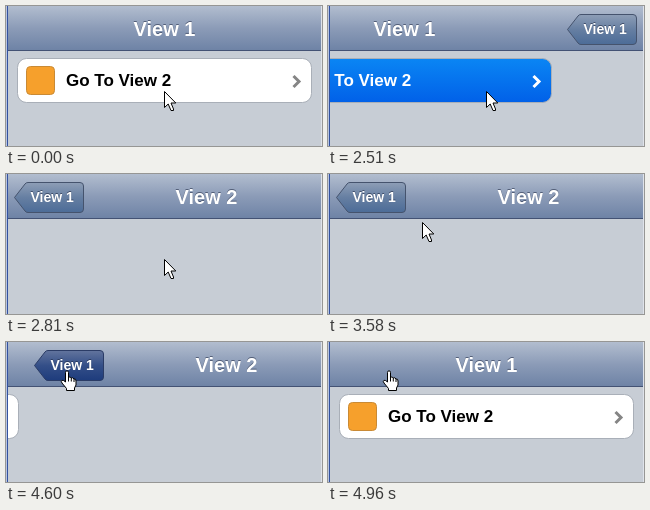
Recreate the animation shown at these times as an HTML page with a canvas. Size 316 by 140 pixels, loop 6220 ms.

```html
<!DOCTYPE html>
<html lang="en">
<head>
<meta charset="utf-8">
<title>View slide</title>
<style>
html, body { margin: 0; width: 100%; height: 100%; overflow: hidden; background: #c7cdd5; }
canvas { display: block; width: 316px; height: 140px; }
</style>
</head>
<body>
<canvas id="stage" width="316" height="140"></canvas>
<script>
const ctx = document.getElementById('stage').getContext('2d');
const LOOP = 6220, STEP = 60, SLIDE = 350, PAGE = 313;
const FONT = '"Liberation Sans", Arial, sans-serif';

const clamp = v => Math.max(0, Math.min(1, v));
const ease = p => p * p * (3 - 2 * p);
const snap = (t, start) => start + Math.floor((t - start) / STEP) * STEP;

function vertical(y0, y1, ...colors) {
  const g = ctx.createLinearGradient(0, y0, 0, y1);
  colors.forEach((c, i) => g.addColorStop(i / (colors.length - 1), c));
  return g;
}

function text(str, x, y, size, color, align = 'left', shadow) {
  ctx.font = `bold ${size}px ${FONT}`;
  ctx.textAlign = align;
  if (shadow) {
    ctx.fillStyle = shadow;
    ctx.fillText(str, x, y - 1);
  }
  ctx.fillStyle = color;
  ctx.fillText(str, x, y);
}

function rounded(x, y, w, h, r) {
  ctx.beginPath();
  ctx.roundRect(x, y, w, h, r);
}

function paint(fill, stroke, width = 1) {
  ctx.fillStyle = fill;
  ctx.fill();
  ctx.strokeStyle = stroke;
  ctx.lineWidth = width;
  ctx.stroke();
}

function page(title, center) {
  ctx.fillStyle = '#c7cdd5';
  ctx.fillRect(2, 0, PAGE, 140);
  ctx.fillStyle = vertical(0, 45, '#b2bdcf', '#8b9bb7', '#6d82a5');
  ctx.fillRect(2, 0, PAGE, 45);
  ctx.fillStyle = '#435274';
  ctx.fillRect(2, 44, PAGE, 1);
  text(title, center, 30, 20, '#fff', 'center', 'rgba(40,50,75,.6)');
}

function listView(active) {
  page('View 1', 158.5);
  rounded(11.5, 52.5, 294, 44, 9);
  paint(active ? vertical(52, 97, '#0a86f4', '#0160e8') : '#fff', '#a9afb8');
  rounded(20.5, 60.5, 28, 28, 4);
  paint('#f6a02c', '#c98a35');
  text('Go To View 2', 60, 80, 17, active ? '#fff' : '#000');
  ctx.beginPath();
  ctx.moveTo(287.5, 70);
  ctx.lineTo(293, 75.5);
  ctx.lineTo(287.5, 81);
  ctx.strokeStyle = active ? '#fff' : '#858585';
  ctx.lineWidth = 3;
  ctx.stroke();
}

function detailView(pressed) {
  page('View 2', 200.5);
  ctx.beginPath();
  ctx.moveTo(8.5, 23.5);
  ctx.lineTo(19, 10);
  ctx.quadraticCurveTo(20, 8.5, 22, 8.5);
  ctx.lineTo(74, 8.5);
  ctx.quadraticCurveTo(77.5, 8.5, 77.5, 12);
  ctx.lineTo(77.5, 35);
  ctx.quadraticCurveTo(77.5, 38.5, 74, 38.5);
  ctx.lineTo(22, 38.5);
  ctx.quadraticCurveTo(20, 38.5, 19, 37);
  ctx.closePath();
  paint(pressed ? vertical(8, 39, '#64769e', '#344f88', '#1d3b7c')
                : vertical(8, 39, '#8f9fb7', '#667fa2', '#4b6b97'),
        pressed ? '#2b3c66' : '#45536d');
  text('View 1', 24.5, 28, 14, '#fff', 'left', 'rgba(30,40,65,.6)');
}

const ARROW = new Path2D('M.5.5V16.5L4.2 13L7 19.5H9.5V18L7 12H11.8Z');
const HAND = new Path2D('M6.5 12V2.5Q6.5.8 8 .8T9.5 2.5V7.5Q11 6 12.3 8Q14 7 15 9Q17 8.5 17 11V15L15.5 18V20.5H7.5V18.5L3 13Q1.5 11 3 10.3Q4.5 10 6.5 12Z');
const FINGERS = new Path2D('M9.5 7V11.5M12.3 8V11.5M15 9V12');

function cursor(x, y, hand) {
  ctx.save();
  ctx.translate(Math.round(x), Math.round(y));
  ctx.lineJoin = 'round';
  if (hand) ctx.translate(-7, 0);
  const shape = hand ? HAND : ARROW;
  ctx.fillStyle = '#fff';
  ctx.strokeStyle = '#000';
  ctx.lineWidth = 1;
  ctx.fill(shape);
  ctx.stroke(shape);
  if (hand) ctx.stroke(FINGERS);
  ctx.restore();
}

// 0 shows the list, 1 the detail view
function slideAt(t) {
  if (t < 4600) return ease(clamp((snap(t, 2330) - 2393) / SLIDE));
  return 1 - ease(clamp((snap(t, 4600) - 4546) / SLIDE));
}

function draw(t) {
  const slide = slideAt(t);
  const shift = Math.round(slide * PAGE);
  ctx.save();
  ctx.beginPath();
  ctx.rect(2, 0, PAGE, 140);
  ctx.clip();
  ctx.translate(-shift, 0);
  if (slide < 1) listView(t >= 2390 && t < 4600);
  ctx.translate(PAGE, 0);
  if (slide > 0) detailView(t >= 4600);
  ctx.restore();

  ctx.fillStyle = '#b9c5df';
  ctx.fillRect(0, 0, 1, 140);
  ctx.fillStyle = '#3352a0';
  ctx.fillRect(1, 0, 1, 140);
  ctx.fillStyle = '#dfe3ea';
  ctx.fillRect(315, 0, 1, 140);

  const p = clamp((snap(t, 3340) - 3280) / 660);
  const move = 1 - Math.pow(1 - p, 1.75);
  const x = 158 - 98 * move, y = 85 - 57 * move;
  cursor(x, y, x < 78 && y < 39);
}

function frame(now) {
  draw(now % LOOP);
  requestAnimationFrame(frame);
}
draw(0);
requestAnimationFrame(frame);
</script>
</body>
</html>
```
